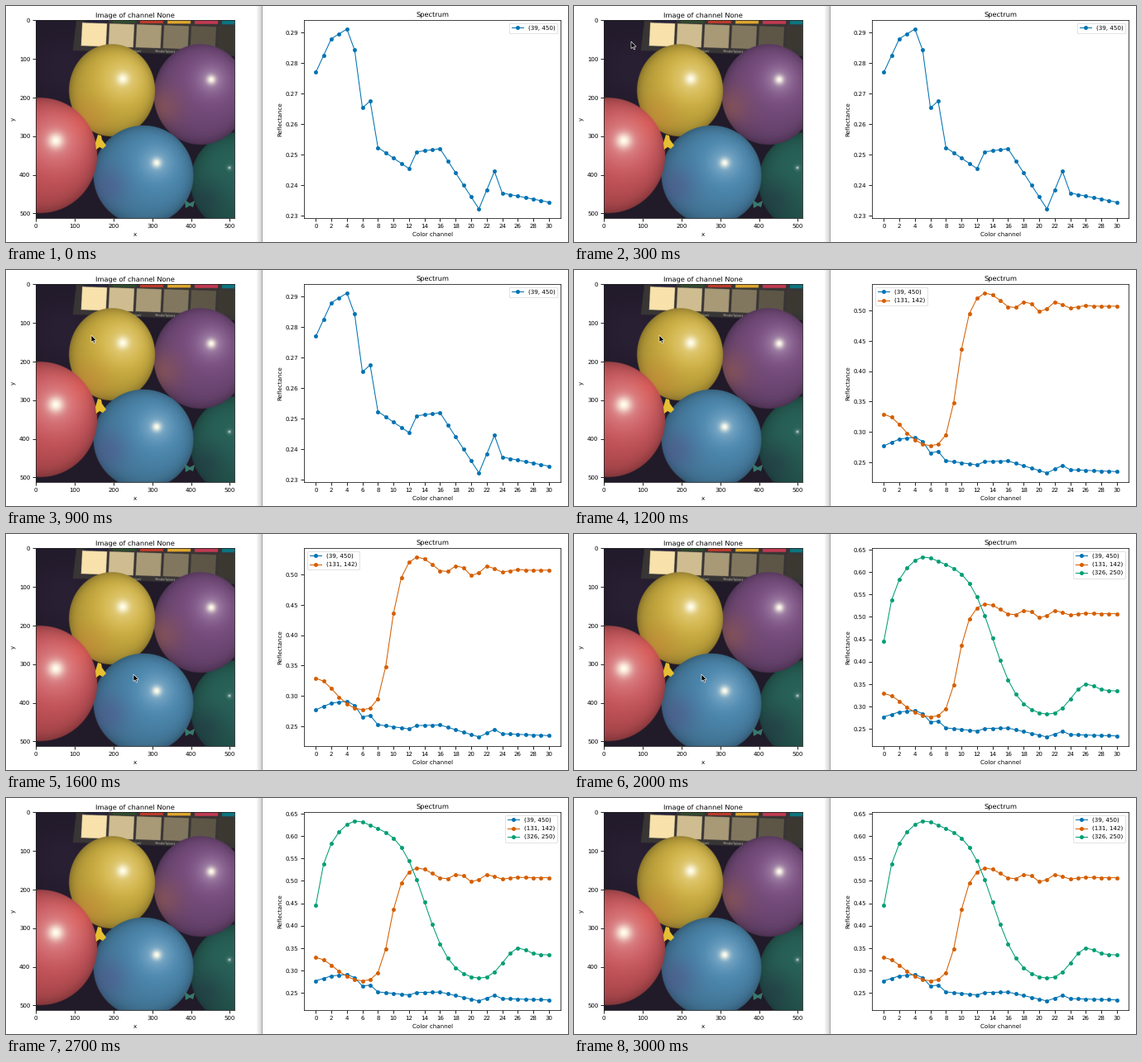
A matplotlib script that plays this animation: 679 px wide and 286 px high, repeating every 3100 ms.

```python
import numpy as np
import matplotlib.pyplot as plt
from matplotlib.animation import FuncAnimation
from matplotlib.patches import Polygon
from matplotlib.ticker import FormatStrFormatter, MultipleLocator

W, H, DPI = 679, 286, 50
FRAMES, INTERVAL = 31, 100
INK = "#222222"

plt.rcParams.update({
    "font.family": "DejaVu Sans", "font.size": 10, "text.hinting": "none",
    "axes.titlesize": 11.8, "axes.labelsize": 10.2, "legend.fontsize": 10.3,
    "axes.linewidth": 1.2, "axes.edgecolor": INK, "axes.labelpad": 4.6,
    "xtick.major.size": 6, "ytick.major.size": 6,
    "xtick.major.width": 1.2, "ytick.major.width": 1.2,
})

fig = plt.figure(figsize=(W / DPI, H / DPI), dpi=DPI, facecolor="white")


def add_axes(x0, y0, x1, y1, **kw):
    """Axes placed by stage pixels, measured from the top left."""
    return fig.add_axes([x0 / W, 1 - y1 / H, (x1 - x0) / W, (y1 - y0) / H], **kw)


# ---- soft balloon picture, computed in stage coordinates ----
LEFT, TOP, RIGHT, BOTTOM = 36, 17, 275.8, 256.8
N = 512
X, Y = np.meshgrid(np.linspace(LEFT, RIGHT, N), np.linspace(TOP, BOTTOM, N))


def blend(img, color, alpha):
    return img + (np.array(color, float) - img) * alpha[..., None]


def spot(center, r):
    return np.exp(-((X - center[0]) ** 2 + (Y - center[1]) ** 2) / r ** 2)


def quad(img, x0, y0, x1, y1, color, slope=0.035, lean=-0.05):
    """Slightly tilted rectangle with soft edges."""
    u = X - lean * (Y - y0)
    v = Y - slope * (X - x0)
    inside = np.minimum.reduce([u - x0, x1 - u, v - y0, y1 - v])
    return blend(img, color, np.clip(inside * 1.5 + 0.5, 0, 1))


def balloon(img, center, radii, color, light, core, tint, tint_at):
    """Shaded ellipse with a highlight and one coloured reflection."""
    r = np.hypot((X - center[0]) / radii[0], (Y - center[1]) / radii[1])
    color = np.array(color, float)
    shade = 0.76 + 0.24 * spot(light, radii[0]) - 0.2 * np.clip(r, 0, 1) ** 8
    body = shade[..., None] * color
    body = blend(body, tint, 0.55 * spot(tint_at, 24))
    body = blend(body, 0.45 * color + 130, 0.55 * spot(light, 3.2 * core))
    body = blend(body, (255, 253, 235), spot(light, core))
    return blend(img, body, np.clip((1 - r) * radii[0] * 1.3 + 0.5, 0, 1))


def picture():
    img = np.full((N, N, 3), (33, 26, 41), float)
    img = blend(img, (46, 36, 58), 0.6 * spot((70, 75), 45))
    img = quad(img, 86, 8, 300, 54, (56, 53, 53), lean=-0.12)
    vivid = [(40, 36, 62), (48, 78, 46), (190, 60, 42),
             (222, 166, 48), (192, 58, 82), (12, 118, 128)]
    for i, color in enumerate(vivid):
        x, y = 92 + 33 * i, 20 + i
        level = (1 - i / 6) ** 1.15
        grey = 32 + level * np.array([217, 194, 140])
        img = quad(img, x, y, x + 30, y + 28, grey)
        img = quad(img, x + 4, 5, x + 32, 20 + 0.4 * i, color, 0, 0)

    img = balloon(img, (280, 213), (57, 60), (40, 98, 88), (270, 196), 1,
                  (36, 56, 68), (240, 235))
    img = balloon(img, (235, 107), (56.5, 61), (126, 82, 134), (248, 89), 5.5,
                  (150, 92, 80), (188, 122))
    img = balloon(img, (128, 102), (52, 56), (218, 186, 68), (141, 88), 7,
                  (204, 140, 56), (98, 136))
    img = balloon(img, (166, 205), (60.5, 60.3), (80, 142, 182), (182, 190), 5.5,
                  (82, 88, 140), (122, 218))
    img = balloon(img, (41, 181), (69, 70), (210, 88, 94), (60, 163), 9.5,
                  (238, 88, 76), (92, 140))
    return np.clip(img / 255, 0, 1)


photo = add_axes(LEFT, TOP, RIGHT, BOTTOM)
photo.imshow(picture(), aspect="auto")
photo.set(title="Image of channel None", xlabel="x", ylabel="y",
          xticks=range(0, 501, 100), yticks=range(0, 501, 100))

# ---- spectra ----
channel = np.arange(31)


def bump(center, width):
    return np.exp(-((channel - center) / width) ** 2)


def step(center, width):
    return 1 / (1 + np.exp(-(channel - center) / width))


dark = np.interp(channel, [0, 2, 4, 5, 6, 7, 8, 12, 13, 16, 21, 23, 24, 30],
                 [.277, .288, .2912, .2843, .2654, .2676, .2524, .2455,
                  .251, .252, .2323, .2446, .2375, .2345])
yellow = (0.274 + 0.055 * bump(0, 3.3) + 0.233 * step(9.5, 0.65)
          + 0.023 * bump(13, 2)
          + 0.01 * np.cos(np.pi / 2 * (channel - 18.3)) * bump(20, 4))
blue = (0.275 + 0.35 * step(14.05, -1.7) - 0.18 * np.exp(-channel / 1.4)
        + 0.015 * bump(5, 2) + 0.06 * step(23.6, 0.8) + 0.018 * bump(26, 1.5))

SPECTRA = [("(39, 450)", "#0072b2", dark),
           ("(131, 142)", "#d55e00", yellow),
           ("(326, 250)", "#009e73", blue)]
plot = add_axes(360.2, TOP, 669.9, BOTTOM)
lines = [plot.plot(v, "o-", color=c, label=name)[0] for name, c, v in SPECTRA]
plot.set(title="Spectrum", xlabel="Color channel", ylabel="Reflectance",
         xlim=(-1.5, 31.5), xticks=range(0, 31, 2))
plot.yaxis.set_major_formatter(FormatStrFormatter("%.2f"))

# ---- overlay: window edge, balloon knots, card print, pointer ----
over = add_axes(0, 0, W, H, zorder=5)
over.imshow(np.linspace(1, 0.82, 24)[None, :], cmap="gray", vmin=0, vmax=1,
            extent=(302, 309, H, 0), aspect="auto")
over.axvspan(309, 310, color="#a8a8a8", lw=0)
over.set(xlim=(0, W), ylim=(H, 0))
over.axis("off")


def shape(points, color, **kw):
    return over.add_patch(Polygon(points, closed=True, fc=color, **kw))


shape([(111, 156), (115, 157), (116, 162), (121, 169), (117, 173),
       (113, 171), (109, 174), (108, 166)], "#e6bf32", lw=0)
shape([(228, 236), (222, 239), (216, 235), (217, 245), (222, 242),
       (226, 244)], "#38786c", lw=0)
for x, y, word in [(155, 56.4, "lorel"), (180, 57.3, "ShadeTablet")]:
    over.text(x, y, word, size=6, color="#b4aea6", rotation=-2, va="baseline")

ARROW = np.array([(0, 0), (0, 8.6), (2, 6.8), (3.4, 9.8), (4.8, 9.2),
                  (3.5, 6.3), (6.1, 6.2)])
pointer = shape(ARROW, "black", ec="white", lw=0.9, zorder=9)

# pointer tip by time in ms
KEYS = [(200, 58, 31), (300, 69, 43), (600, 103, 79), (1200, 103, 79),
        (1500, 154, 170), (2000, 154, 170), (2400, 56, 31), (2500, 42, 19)]
TIMES, PX, PY = zip(*KEYS)


def show_spectra(count):
    for i, line in enumerate(lines):
        line.set_visible(i < count)
    values = np.concatenate([v for _, _, v in SPECTRA[:count]])
    pad = 0.05 * np.ptp(values)
    plot.set_ylim(values.min() - pad, values.max() + pad)
    plot.yaxis.set_major_locator(MultipleLocator(0.01 if count == 1 else 0.05))
    plot.legend(handles=lines[:count],
                loc="upper left" if count == 2 else "upper right")


def update(frame):
    t = frame * INTERVAL
    show_spectra(1 + (t >= 1100) + (t >= 1900))
    pointer.set_visible(TIMES[0] <= t <= TIMES[-1])
    pointer.set_xy(ARROW + (np.interp(t, TIMES, PX), np.interp(t, TIMES, PY)))
    return [*lines, pointer]


anim = FuncAnimation(fig, update, frames=FRAMES, interval=INTERVAL,
                     init_func=lambda: [], repeat=True, repeat_delay=0)
plt.show()
```
